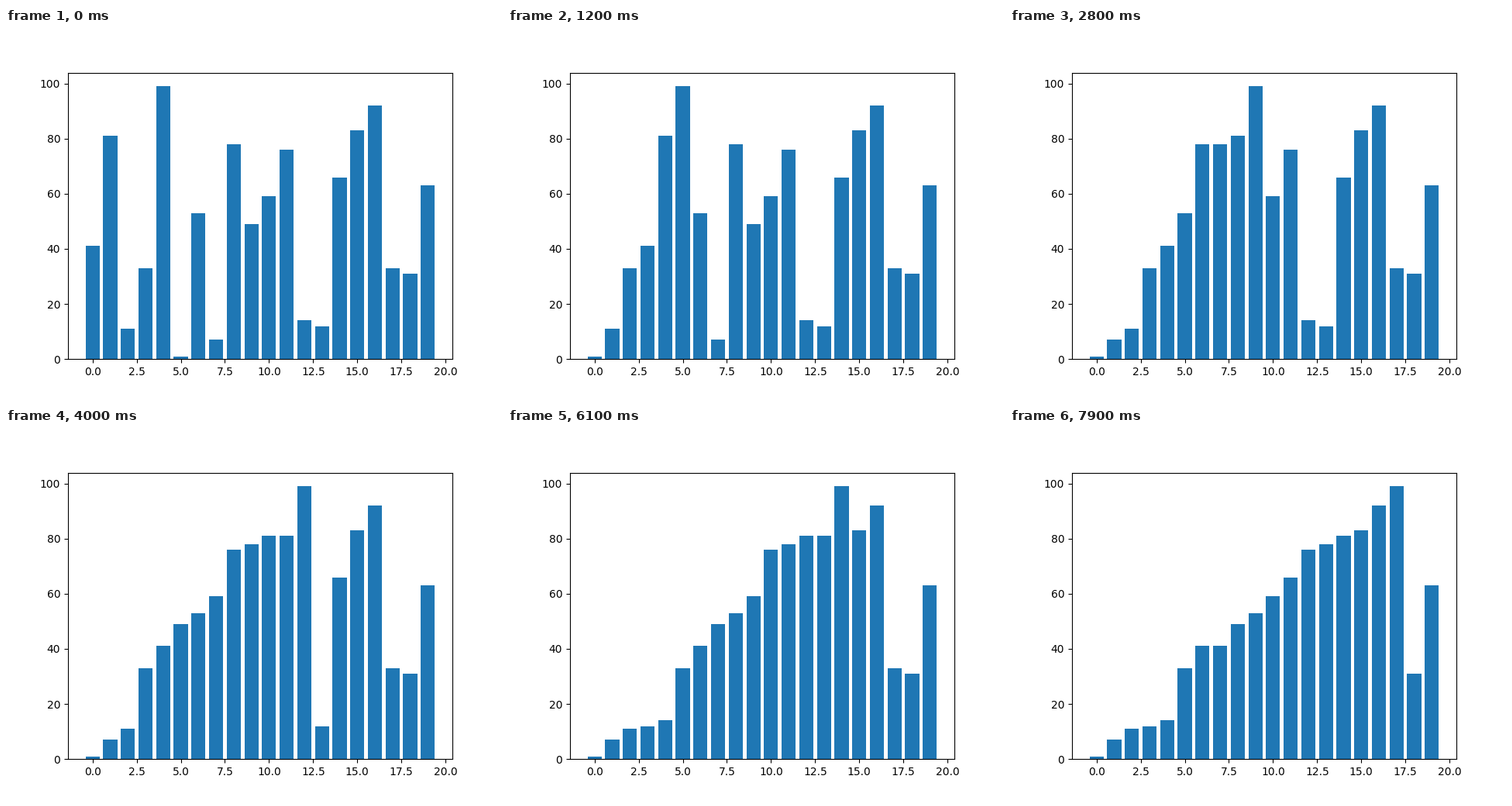
A matplotlib script for the animation above (8 s loop, 640 px wide and 480 px high).

```python
from itertools import islice

import matplotlib.pyplot as plt
from matplotlib.animation import FuncAnimation

FRAMES = 80
INTERVAL = 100  # ms

# The unsorted data; every later state follows from the sort.
START = [41, 81, 11, 33, 99, 1, 53, 7, 78, 49,
         59, 76, 14, 12, 66, 83, 92, 33, 31, 63]


def insertion_sort(values):
    """Yield the list at the start and after every write that changes it."""
    a = list(values)
    yield a[:]
    for i in range(1, len(a)):
        key, j = a[i], i
        while j > 0 and a[j - 1] > key:
            a[j] = a[j - 1]
            j -= 1
            yield a[:]
        if j < i:
            a[j] = key
            yield a[:]


states = list(islice(insertion_sort(START), FRAMES))

fig, ax = plt.subplots(figsize=(6.4, 4.8), dpi=100)
bars = ax.bar(range(len(START)), START)


def update(frame):
    for bar, height in zip(bars, states[frame]):
        bar.set_height(height)
    return list(bars)


anim = FuncAnimation(fig, update, frames=FRAMES, interval=INTERVAL,
                     init_func=lambda: update(0), repeat=True,
                     repeat_delay=0, blit=False)

plt.show()
```
